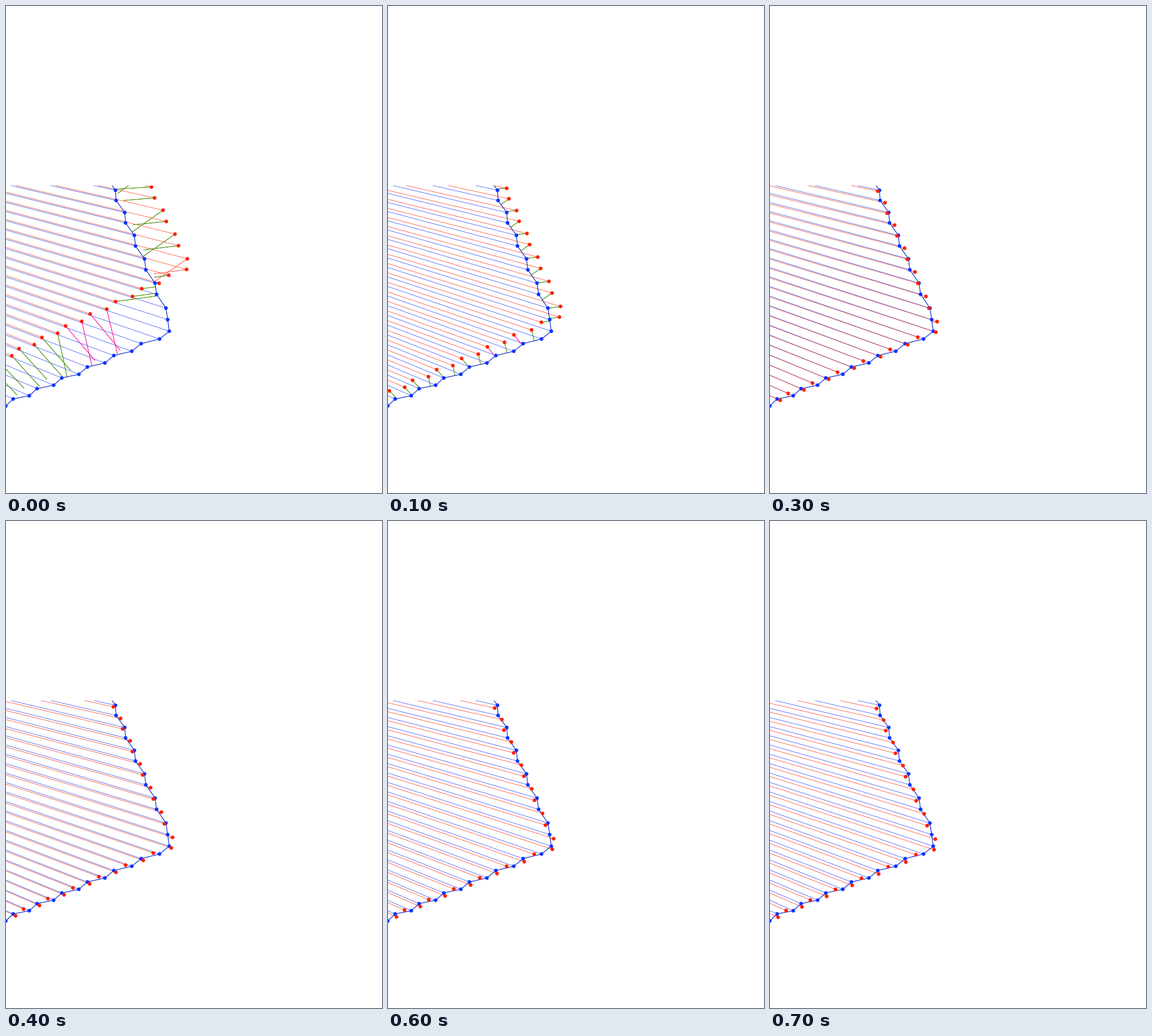
These frames come from a looping animation (612x792 px, 0.8 s). A matplotlib script:

```python
import numpy as np
import matplotlib.pyplot as plt
from matplotlib.animation import FuncAnimation
from matplotlib.collections import LineCollection, PolyCollection

W, H, TOP = 612, 792, 292
PX = 0.72  # points per pixel at 100 dpi
BLUE, RED, GREEN, MAGENTA = "#0c33ff", "#ff2000", "#38b020", "#ff28c0"
CORNER = 12  # first beam that hits the lower wall
STEPS = 8

turn = np.linspace(0, 2 * np.pi, 40)
disc = 3 * np.column_stack([np.cos(turn), np.sin(turn)])


def sweep(sensor, beams, start, upper, lower):
    """Points of a scan with half-degree beams; upper and lower give
    each wall's first range and the size of its zigzag."""
    i = np.asarray(beams)
    t, u = i - .5, i - CORNER - .5
    zigzag = np.where(i % 2, -1, 1)
    r = np.where(i < CORNER,
                 upper[0] + 11.15 * t + .19 * t**2 + upper[1] * zigzag,
                 lower[0] - 18.6 * u + .2 * u**2 + lower[1] * zigzag)
    angle = np.radians(start + .5 * i)
    return sensor + np.column_stack([r * np.cos(angle), r * np.sin(angle)])


wall_sensor = np.array([-1597, -89])
wall = sweep(wall_sensor, range(-1, 28), 12.35, (1819.5, 3.3), (1957, -3.8))
scan_sensor = np.array([-1590, -80])
scan = sweep(scan_sensor, range(29), 12.314, (1812.5, -2.2), (1943.3, 3.4))
pivot = np.array([269.7, 517.8])


def pose(step):
    """Offset x, y and rotation still left before the scans agree."""
    if step == 0:
        return 26.1, -106.3, -.0502
    if step == 1:
        return 11.7, -28.8, -.0178
    left = ((STEPS - 1 - step) / (STEPS - 3)) ** 1.2
    return 3.8 * left, -5.4 * left, -.0047 * left


def place(points, step):
    x, y, angle = pose(step)
    c, s = np.cos(angle), np.sin(angle)
    return (points - pivot) @ np.array([[c, s], [-s, c]]) + pivot + (x, y)


def match(point):
    """Foot of a point on the line through its nearest wall point
    and the nearer neighbour of that."""
    dist = np.hypot(*(wall - point).T)
    near = np.clip(dist.argmin(), 1, len(wall) - 2)
    other = min(near - 1, near + 1, key=lambda j: dist[j])
    a, d = wall[near], wall[other] - wall[near]
    return a + d * ((point - a) @ d) / (d @ d)


def link_color(step, i):
    if step > 1 or (step == 0 and i in (11, 12)):
        return "none"
    rejected = range(18, 22) if step == 0 else (15, 17)
    return MAGENTA if i in rejected else GREEN


def rays(sensor, points):
    return [(sensor, p) for p in points]


def dots(points):
    return [p + disc for p in points]


fig = plt.figure(figsize=(W / 100, H / 100), dpi=100, facecolor="white")
ax = fig.add_axes([0, 0, 1, (H - TOP) / H])
ax.set(xlim=(0, W), ylim=(H, TOP))
ax.axis("off")


def add_lines(segments, color, width, z):
    return ax.add_collection(LineCollection(
        segments, colors=color, linewidths=width * PX, zorder=z), autolim=False)


def add_dots(points, color, z):
    return ax.add_collection(PolyCollection(
        dots(points), facecolors=color, linewidths=0, zorder=z), autolim=False)


add_lines(rays(wall_sensor, wall), BLUE, .6, 1)
scan_rays = add_lines([], RED, .6, 2)
thin_links = add_lines([], RED, .7, 3)
links = add_lines([], GREEN, 1, 4)
ax.plot(*wall.T, color="#0a28c8", lw=1.1 * PX, zorder=5)
add_dots(wall, BLUE, 6)
scan_dots = add_dots(scan, RED, 7)


def draw(step):
    points = place(scan, step)
    scan_rays.set_segments(rays(place(scan_sensor, step), points))
    pairs = [(p, match(p)) for p in points]
    thin_links.set_segments(pairs)
    links.set_segments(pairs)
    links.set_color([link_color(step, i) for i in range(len(points))])
    scan_dots.set_verts(dots(points))
    return scan_rays, thin_links, links, scan_dots


anim = FuncAnimation(fig, draw, frames=STEPS, interval=100, repeat=True,
                     repeat_delay=0)
plt.show()
```
